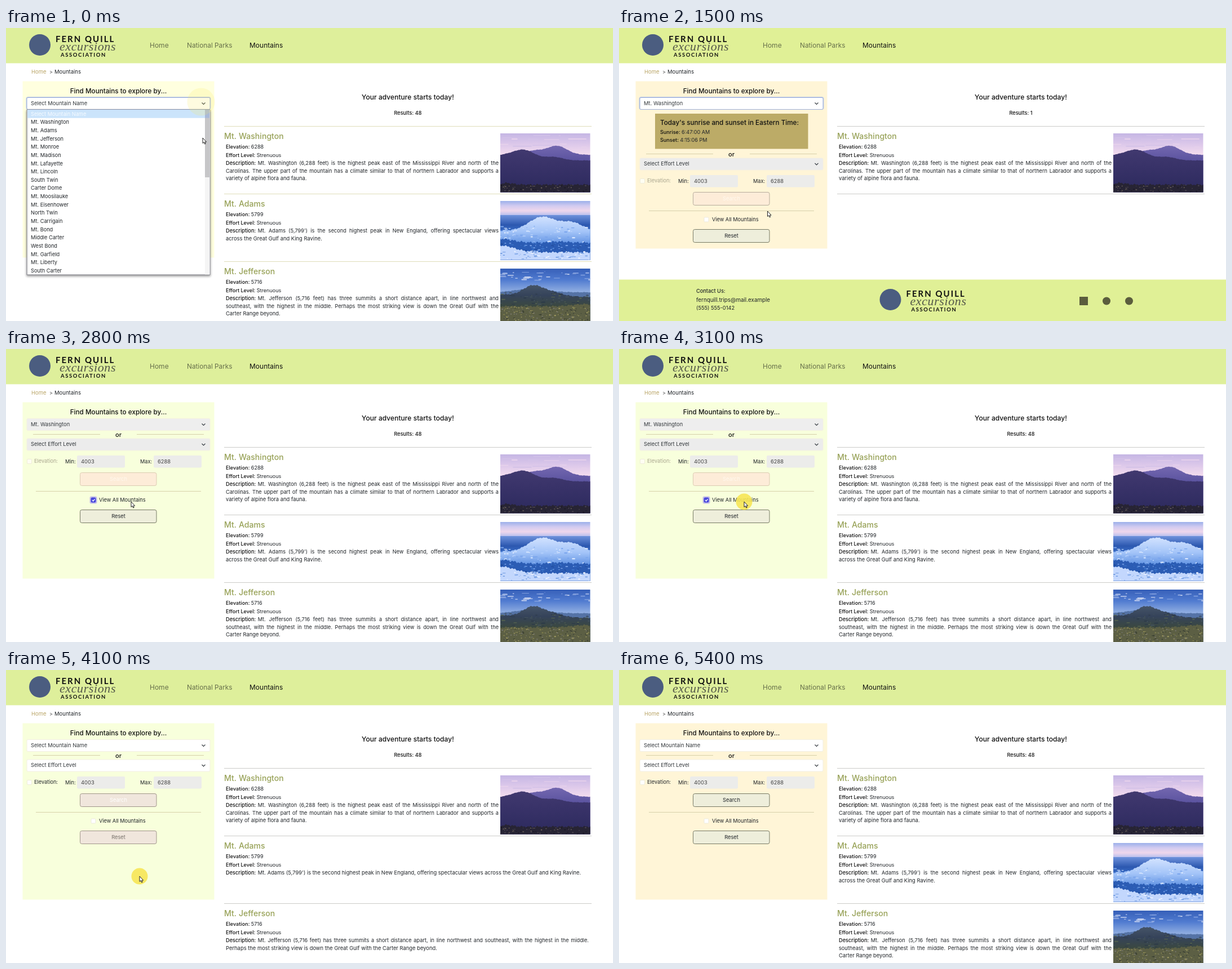
Animation, 1077 px wide and 520 px high, one loop 5600 ms. Source, as an HTML page with a canvas:

```html
<!DOCTYPE html>
<html lang="en">
<head>
<meta charset="utf-8">
<title>Mountains</title>
<style>
html, body { margin: 0; width: 100%; height: 100%; overflow: hidden; background: #fff; }
canvas { display: block; }
</style>
</head>
<body>
<canvas id="stage" width="1077" height="520"></canvas>
<script>
const c = document.getElementById('stage').getContext('2d');
const LOOP = 5600, STEP = 100, ROW = 14.64;
const INK = '#212529', DARK = '#111', BORDER = '#777a64';

const options = ['Select Mountain Name', 'Mt. Washington', 'Mt. Adams', 'Mt. Jefferson', 'Mt. Monroe',
  'Mt. Madison', 'Mt. Lafayette', 'Mt. Lincoln', 'South Twin', 'Carter Dome', 'Mt. Moosilauke',
  'Mt. Eisenhower', 'North Twin', 'Mt. Carrigain', 'Mt. Bond', 'Middle Carter', 'West Bond',
  'Mt. Garfield', 'Mt. Liberty', 'South Carter'];

// "|" breaks a line beside the photo, "/" breaks it while the photo is still loading
const mountains = [
  { name: 'Mt. Washington', feet: 6288, photo: duskPhoto,
    text: 'Mt. Washington (6,288 feet) is the highest peak east of the Mississippi River and north of the|Carolinas. The upper part of the mountain has a climate similar to that of northern Labrador and supports a|variety of alpine flora and fauna.' },
  { name: 'Mt. Adams', feet: 5799, photo: snowPhoto,
    text: 'Mt. Adams (5,799\') is the second highest peak in New England, offering spectacular views|across the Great Gulf and King Ravine.' },
  { name: 'Mt. Jefferson', feet: 5716, photo: rockyPhoto,
    text: 'Mt. Jefferson (5,716 feet) has three summits a short distance apart, in line northwest and|southeast, with the highest in the middle./Perhaps the most striking view is down the Great Gulf with the|Carter Range beyond.' }
];

// where the pointer goes: it leaves, arrives and may click
const stops = [
  { leave: -600, arrive: -500, x: 346, y: 131, click: -400 },
  { leave: -300, arrive: 0, x: 349, y: 195 },
  { leave: 100, arrive: 400, x: 337, y: 160, click: 700 },
  { leave: 1200, arrive: 1800, x: 190, y: 336, click: 1900 },
  { leave: 2400, arrive: 2800, x: 222, y: 271, click: 3000 },
  { leave: 3200, arrive: 3700, x: 237, y: 366, click: 3900 },
  { leave: 4400, arrive: 4700, x: 380, y: 78 }
];

function rect(x, y, w, h, fill, stroke, r = 0) {
  c.beginPath();
  c.roundRect(x, y, w, h, r);
  if (fill) { c.fillStyle = fill; c.fill(); }
  if (stroke) { c.strokeStyle = stroke; c.lineWidth = 1; c.stroke(); }
}

function circle(x, y, r, fill) {
  c.beginPath();
  c.arc(x, y, r, 0, 7);
  c.fillStyle = fill;
  c.fill();
}

function polyline(points, color, width) {
  c.beginPath();
  points.forEach(([x, y]) => c.lineTo(x, y));
  c.strokeStyle = color;
  c.lineWidth = width;
  c.stroke();
}

// y is the middle of the capitals; returns the x where the text ends
function text(s, x, y, size = 9.3, color = INK, weight = 400, align = 'left') {
  c.font = `${weight} ${size}px Inter, sans-serif`;
  c.textAlign = align;
  c.fillStyle = color;
  c.fillText(s, x, y + size * 0.36);
  return x + c.measureText(s).width;
}

function labelled(label, value, x, y) {
  text(value, text(label + ': ', x, y, 9.1, DARK, 500), y, 9.1);
}

function justified(s, x, y, right) {
  c.font = '400 9.2px Inter, sans-serif';
  c.wordSpacing = (right - x - c.measureText(s).width) / (s.split(' ').length - 1) + 'px';
  text(s, x, y, 9.2);
  c.wordSpacing = '0px';
}

function rule(x1, x2, y, color) { rect(x1, y, x2 - x1, 1, color); }

function vertical(y1, y2, ...colors) {
  const g = c.createLinearGradient(0, y1, 0, y2);
  colors.forEach((color, i) => g.addColorStop(i / (colors.length - 1), color));
  return g;
}

// a skyline of bell-shaped peaks with a little roughness
function ridge(base, peaks, fill, rough = 0.5) {
  c.beginPath();
  c.moveTo(0, 105);
  for (let x = 0; x <= 160; x++) {
    let y = base + rough * (Math.sin(x * 0.45) + Math.sin(x * 1.13));
    for (const [px, height, width] of peaks) y -= height * Math.exp(-(((x - px) / width) ** 2));
    c.lineTo(x, y);
  }
  c.lineTo(160, 105);
  c.fillStyle = fill;
  c.fill();
}

function specks(count, top, bottom, colors, length = 3) {
  let seed = 7 + count;
  const random = () => (seed = seed * 16807 % 2147483647) / 2147483647;
  random();
  for (let i = 0; i < count; i++) {
    const x = random() * 164 - 4, y = top + random() * (bottom - top);
    rect(x, y, 1 + random() * length, 1 + random(), colors[i % colors.length], null, 0.7);
  }
}

function duskPhoto() {
  rect(0, 0, 160, 105, vertical(0, 38, '#c5b6e4', '#dcc8ea', '#f3dcee'));
  specks(12, 3, 24, ['#e8d2ec', '#d3c2e8'], 36);
  ridge(38, [[100, 16, 25], [60, 7, 20]], vertical(20, 48, '#7468b0', '#5c54a0'), 0.2);
  ridge(48, [[42, 18, 28], [0, 8, 30], [95, 6, 22]], vertical(28, 92, '#41396f', '#383268', '#2f2c60'), 0.2);
  ridge(91, [[12, 3, 14]], '#272434', 0.8);
  specks(90, 91, 104, ['#4c4652', '#1b1826', '#6a6058'], 2);
}

function snowPhoto() {
  rect(0, 0, 160, 105, vertical(0, 26, '#9cb0ea', '#d2cbf0', '#efd7ec', '#b4bdee'));
  rect(0, 25, 160, 80, vertical(25, 60, '#6f92dc', '#2c58b0', '#3f76d0'));
  ridge(53, [[75, 25, 34], [128, 14, 26]], vertical(27, 82, '#d3e3ff', '#a3c4f8', '#4f85dc'));
  specks(90, 44, 72, ['#e4eeff', '#79a4ec', '#b4cffb'], 5);
  ridge(74, [[0, 7, 30], [105, 2, 20]], '#2b5cb4', 1);
  specks(70, 74, 88, ['#3f78ce', '#1f4a9a', '#7ba4ea'], 4);
  ridge(91, [[0, 12, 35]], '#c3d7fd', 0.8);
  specks(60, 88, 104, ['#8fb3ee', '#edf4ff', '#6d99e0'], 5);
}

function rockyPhoto() {
  rect(0, 0, 160, 105, vertical(0, 40, '#365fb8', '#507bd0', '#8dabe0'));
  specks(34, 4, 20, ['#7f9ddd', '#c3d0ee', '#9cb2e4'], 12);
  ridge(42, [[55, 6, 40]], '#5573a6', 0.3);
  ridge(50, [[58, 20, 26], [0, 4, 30], [95, 7, 24]], vertical(25, 70, '#49586a', '#35435a', '#3c493c'));
  specks(70, 42, 66, ['#2d3a48', '#52604f', '#43525c'], 6);
  ridge(67, [[150, 4, 30]], '#5c5f44', 0.8);
  specks(260, 67, 104, ['#85834e', '#3a3f33', '#77776e', '#a39d62'], 2.5);
}

function logo(x, y) {
  const word = (s, wx, wy, font, spacing, color) => {
    c.font = font;
    c.letterSpacing = spacing + 'px';
    c.fillStyle = color;
    c.fillText(s, wx, wy);
  };
  c.save();
  c.translate(x, y);
  circle(60, 30, 19, '#4b5d80');
  c.textAlign = 'left';
  word('FERN QUILL', 88, 25, '700 15px Lato, sans-serif', 2, DARK);
  word('ASSOCIATION', 97, 50.5, '700 9.5px Lato, sans-serif', 1.6, DARK);
  word('excursions', 95, 40, 'italic 22px "Liberation Serif", serif', 0.6, '#55594a');
  c.restore();
}

function header(green) {
  rect(0, 0, 1077, 62.5, green);
  logo(0, 0);
  text('Home', 255, 30.5, 12, '#67704b');
  text('National Parks', 321, 30.5, 11.8, '#67704b');
  text('Mountains', 432, 30.5, 12, DARK);
  text('Home', 45, 78, 9.5, '#b9a465');
  text('>', 77, 78, 9, '#555');
  text('Mountains', 86, 78, 9.5);
}

function footer(green) {
  rect(0, 446.5, 1077, 74, green);
  text('Contact Us:', 137, 466.5, 9.2, INK, 500);
  text('fernquill.trips@mail.example', 137, 482.5, 9.8);
  text('(555) 555-0142', 137, 496.5);
  logo(421.5, 452);
  rect(817, 477, 15, 15, '#5b5d3d');
  for (const x of [865, 905]) circle(x, 484.5, 7, '#5b5d3d');
}

function select(label, y, fill, focused) {
  if (focused) rect(35.5, y - 1.5, 328, 23, '#bccae6', null, 4);
  rect(37, y, 325, 21, fill, focused ? '#9eb0da' : '#f3efe2', 2);
  text(label, 44, y + 10, 9.4, '#33383c');
  polyline([[347.5, y + 9], [350.5, y + 12], [353.5, y + 9]], '#343a40', 1.1);
}

function button(label, y, [fill, border, color]) {
  rect(131.5, y + 0.5, 135.5, 23, fill, border, 3);
  text(label, 199.5, y + 12, 9.3, color, 400, 'center');
}

function checkbox(y, checked, focused) {
  const blue = '#4848dc';
  if (focused) rect(148.5, y - 6.5, 13, 13, '#c3bde8', null, 3);
  rect(151, y - 4, 8, 8, checked ? blue : '#fff', checked ? blue : '#ece9dc', 1.5);
  if (checked) polyline([[153, y], [154.7, y + 2], [157.5, y - 1.7]], '#fff', 1.3);
}

function sidebar(s) {
  const lineColor = '#d6d0aa';
  const active = s.fading ? ['#f0e6dc', '#a0958a', '#77716a'] : ['#eeeedb', BORDER, INK];
  const search = s.chosen ? ['#fdecd8', s.single ? '#b5ac9c' : '#dccbb2', '#fff8ee']
    : s.fading ? ['#f0e6dc', '#a0958a', '#fff'] : active;
  rect(29.5, 94.5, 340, s.single ? 297 : 313, s.panel);
  text('Find Mountains to explore by...', 199.5, 112, 11.7, DARK, 500, 'center');
  select(options[s.chosen ? 1 : 0], 123.5, s.viewAll ? '#eee' : '#fff', s.selectFocus);
  if (s.single) {
    rect(64, 152, 271.5, 62.5, '#bcab67');
    text("Today's sunrise and sunset in Eastern Time:", 73, 167.5, 11.7, DARK, 500);
    labelled('Sunrise', '6:47:00 AM', 73, 185);
    labelled('Sunset', '4:15:06 PM', 73, 198.5);
  }
  c.save();
  c.translate(0, s.single ? 72 : 0);
  for (const x of [48, 232]) rule(x, x + 119, 151, lineColor);
  text('or', 199.5, 152, 11, DARK, 500, 'center');
  select('Select Effort Level', 159, s.chosen ? '#ececec' : '#fff');
  rect(37.5, 195.5, 8, 8, s.chosen ? '#fffef2' : '#fff', '#efecd9', 1.5);
  text('Elevation:', 50, 199, 9.2, s.chosen ? '#a9a58e' : INK);
  for (const [label, value, x, box] of [['Min:', 4003, 105, 126], ['Max:', 6288, 238, 262]]) {
    text(label, x, 199.5, 9.2);
    rect(box, 189, 85, 21.5, '#ececea', null, 2);
    text(value, box + 7, 199.5, 9.4, '#444');
  }
  button('Search', 219, search);
  rule(53, 346, 252, lineColor);
  checkbox(268, s.viewAll, s.checkFocus);
  text('View All Mountains', 165, 268, 9.2);
  button('Reset', 285, active);
  c.restore();
}

function description(m, y, loading) {
  const lines = loading ? m.text.replaceAll('|', ' ').split('/') : m.text.replaceAll('/', ' ').split('|');
  const start = text('Description: ', 390, y, 9.2, DARK, 500) + 1;
  lines.forEach((line, n) => {
    const x = n ? 390 : start, top = y + 13.4 * n;
    if (n < lines.length - 1) justified(line, x, top, loading ? 1034 : 874);
    else text(line, x, top, 9.4);
  });
}

function results(s) {
  const line = s.open ? '#dfddb9' : '#cbcbc8';
  text('Your adventure starts today!', 713, 123, 12.1, DARK, 500, 'center');
  text('Results: ' + (s.single ? 1 : 48), 713, 151, 9.2, DARK, 500, 'center');
  rule(387, 1039, 174, line);
  mountains.slice(0, s.single ? 1 : 3).forEach((m, i) => {
    const loading = s.fading && i > 0;
    c.save();
    c.translate(0, 120 * i);
    text(m.name, 387, 191.5, 14.1, '#98a258', 500);
    labelled('Elevation', m.feet, 390, 211);
    labelled('Effort Level', 'Strenuous', 390, 225.5);
    description(m, 240, loading);
    rule(387, 1039, 294, line);
    if (!loading) {
      c.translate(877, 187);
      c.beginPath();
      c.rect(0, 0, 159.5, 104.5);
      c.clip();
      m.photo();
    }
    c.restore();
  });
}

function dropdown(hovered) {
  const y = 145 + ROW * hovered;
  c.save();
  c.shadowColor = 'rgba(0,0,0,.4)';
  c.shadowBlur = 4;
  c.shadowOffsetY = 2;
  rect(37, 145, 325, 293, '#fff', '#80808a');
  c.restore();
  rect(38, y, 315, ROW, '#cbe4fb');
  rect(353, 145.5, 8.5, 292, '#f5f5f5');
  rect(353, 145.5, 8, 119.5, '#c6c6c8');
  rect(353, y, 8, ROW, '#a9b9d8');
  options.forEach((name, i) => text(name, 44, 152.4 + ROW * i, 9.2, i === hovered ? '#f7fbff' : INK));
}

function halo(t) {
  for (const { click, x, y } of stops) {
    const age = t - click;
    if (!(age >= 0 && age < 500)) continue;
    const p = Math.max(0, (age - 200) / 200);
    circle(x, y, 14.5 + 10 * p, `rgba(246,230,85,${0.9 - 0.72 * p})`);
  }
}

// steady sideways, eased out vertically
function pointerAt(t) {
  const i = stops.findLastIndex(stop => t >= stop.leave);
  const from = stops[i - 1], to = stops[i];
  const p = Math.min(1, (t - to.leave) / (to.arrive - to.leave));
  return [from.x + (to.x - from.x) * p, to.y - (to.y - from.y) * (1 - p) ** 4];
}

function pointer(x, y, hand) {
  c.save();
  c.translate(x, y);
  if (hand) {
    rect(-3, 5, 8.5, 8, '#fff', '#222', 2.5);
    rect(-1, 0, 2.2, 9, '#fff', '#222', 1);
  } else {
    const shape = new Path2D('M0 0V9.5L2.2 7.6L3.7 11L5.2 10.3L3.8 7.2H6.6Z');
    c.fillStyle = '#fff';
    c.strokeStyle = '#222';
    c.lineWidth = 1;
    c.fill(shape);
    c.stroke(shape);
  }
  c.restore();
}

function draw(t) {
  const between = (a, b) => t >= a && t < b;
  const single = between(900, 2100) || between(3200, 4100);
  const viewAll = between(2100, 3200);
  const s = {
    single, viewAll,
    open: t < 900,
    chosen: between(900, 4100),
    selectFocus: t < 1900,
    checkFocus: between(1900, 4100),
    fading: between(4100, 4200),
    panel: t < 700 ? '#ffffdf' : t < 900 || viewAll || between(4100, 4300) ? '#f8ffdc' : '#fff5d7'
  };
  const green = single ? '#e0f096' : '#deef9b';
  const [x, y] = pointerAt(t);
  const resetTop = single ? 357 : 285;
  rect(0, 0, 1077, 520, '#fff');
  header(green);
  sidebar(s);
  results(s);
  if (single) footer(green);
  if (s.open) dropdown(t < 100 ? 0 : Math.floor((y - 145) / ROW));
  halo(t);
  if (t < 5400) pointer(x, y, !s.open && x > 132 && x < 267 && y > resetTop && y < resetTop + 24);
}

function tick(now) {
  draw(Math.floor(now % LOOP / STEP) * STEP);
  requestAnimationFrame(tick);
}
requestAnimationFrame(tick);
</script>
</body>
</html>
```
